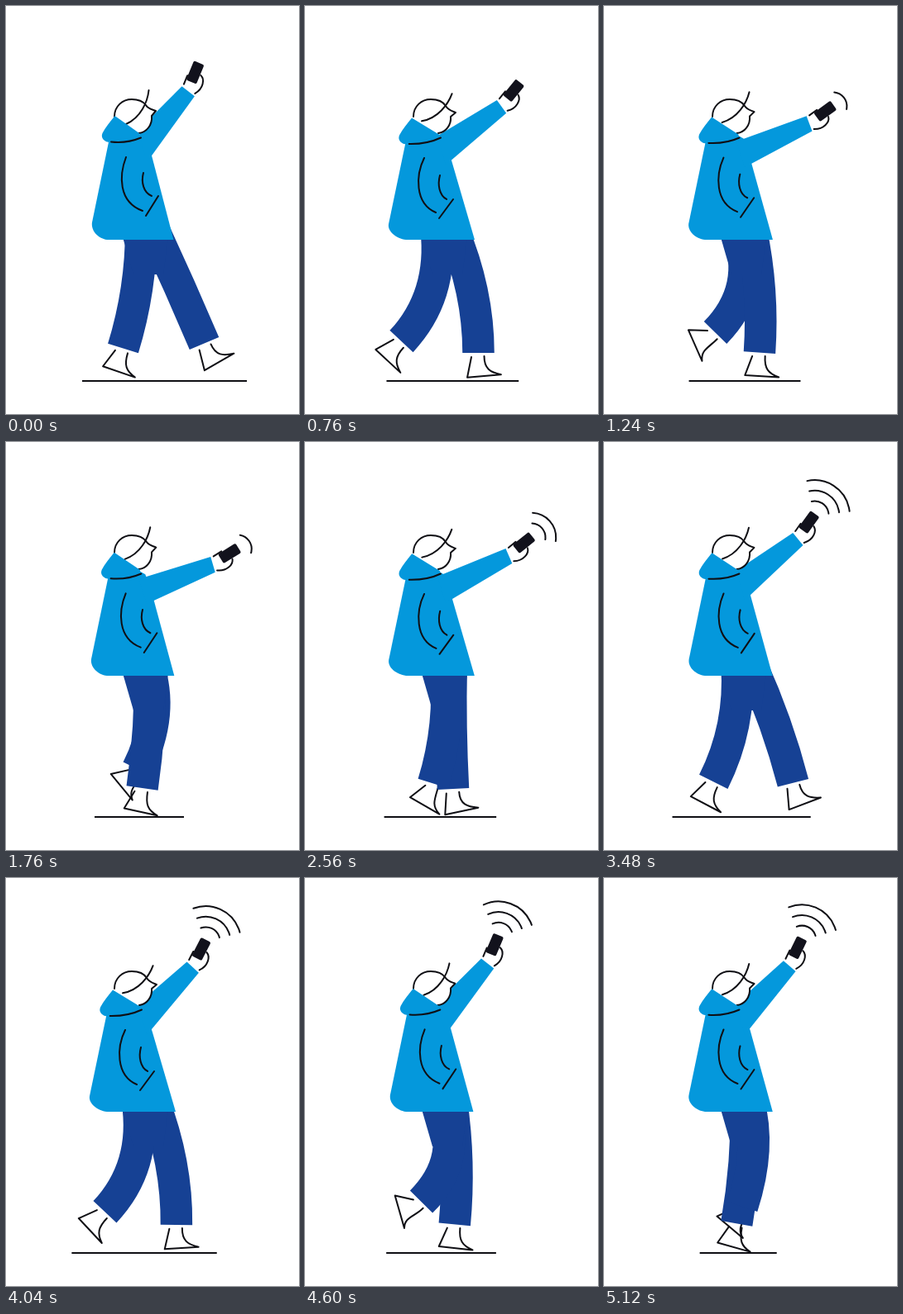
Animation, 354 px wide and 494 px high, one loop 5160 ms. Source, as an HTML page with a canvas:

```html
<!DOCTYPE html>
<html lang="en">
<head>
<meta charset="utf-8">
<title>Searching for signal</title>
<style>
  html, body { margin: 0; width: 100%; height: 100%; overflow: hidden; background: #fff; }
  canvas { display: block; width: 354px; height: 494px; }
</style>
</head>
<body>
<canvas id="stage"></canvas>
<script>
const W = 354, H = 494, LOOP = 5160, TICK = 40;
const STEP = 3200, STRIDE = 2 * STEP;
const COAT = '#0498dc', PANTS = '#164194', INK = '#0f0f14', DARK = '#12121c';
const RAD = Math.PI / 180;

const canvas = document.getElementById('stage');
const ctx = canvas.getContext('2d');
const dpr = window.devicePixelRatio || 1;
canvas.width = W * dpr;
canvas.height = H * dpr;

// Key poses of one leg: time, ankle x, ankle y, cuff angle, sole angle
const STRIKE = [239.5, 408.5, -23, -30];
const WALK = [
  [0, ...STRIKE],
  [760, 209.5, 420, 0, -5],       // flat
  [1840, 161, 419, 9, 14],        // under the body
  [2560, 155, 413.5, 17, 30],     // heel up
  [3200, 141.5, 414.5, 17, 19],   // trailing
  [3960, 116.5, 406, 43, 43],     // push off
  [4600, 140.5, 392, 45, 74],     // lifted
  [5120, 167, 398, 18, 40],       // passing
  [5760, 179, 420, -3, -12],      // reaching
  [STRIDE, ...STRIKE]
];

// Key points of the ground line: time, left end, right end
const GROUND = [[0, 92, 291], [1760, 107, 215], [3940, 76, 259], [5160, 117, 207]];

function between(keys, t) {
  const i = keys.findIndex(k => t < k[0]);
  const a = keys[i - 1], b = keys[i], u = (t - a[0]) / (b[0] - a[0]);
  return a.slice(1).map((v, j) => v + (b[j + 1] - v) * u);
}

// Arm swings down in 1600 ms and back up in 3200 ms
function armAngle(t) {
  const u = t % 4800;
  const swing = u < 1600 ? Math.cos(Math.PI * u / 1600) : -Math.cos(Math.PI * (u - 1600) / 3200);
  return -37 - 18 * swing;
}

// Torso leans once per 1600 ms, starting from upright
function leanAt(t) {
  const low = t < 800 ? 0 : 0.25;
  return low + (1 - low) * (1 - Math.cos(Math.PI * t / 800)) / 2;
}

// Points of 2 numbers are corners, points of 6 are cubic curves
function shape(parts) {
  ctx.beginPath();
  parts.forEach((p, i) => {
    if (p.length === 6) ctx.bezierCurveTo(...p);
    else if (i) ctx.lineTo(...p);
    else ctx.moveTo(...p);
  });
}
function fill(parts, color) { shape(parts); ctx.fillStyle = color; ctx.fill(); }
function line(parts) { shape(parts); ctx.strokeStyle = INK; ctx.lineWidth = 2; ctx.stroke(); }

// Local axes at (x, y) turned by deg
function frame(x, y, deg) {
  const c = Math.cos(deg * RAD), s = Math.sin(deg * RAD);
  return (u, v) => [x + c * u - s * v, y + s * u + c * v];
}

function foot([x, y, cuff, sole]) {
  const shin = frame(x, y, cuff), shoe = frame(x, y, sole);
  line([
    shin(7, 4), [...shin(7, 19), ...shoe(12, 24.5), ...shoe(25, 28.5)],
    shoe(-16, 28.5), shin(-8.5, 5)
  ]);
}

function pants([x, y, cuff]) {
  const hip = 168 + 10 * Math.tanh((x - 152) / 20);
  ctx.beginPath();
  ctx.moveTo(hip, 270);
  ctx.quadraticCurveTo(...frame(x, y, cuff)(0, -75), x, y);
  ctx.strokeStyle = PANTS;
  ctx.lineWidth = 38.5;
  ctx.lineCap = 'butt';
  ctx.stroke();
  ctx.lineCap = 'round';
}

function arm(t) {
  const deg = armAngle(t), drop = (deg + 55) / 36;
  const at = frame(165, 172, deg);
  fill([[160, 150 + 16 * drop], at(88.5, -4), at(87.5, 15.5), [170, 189.5 + 6.5 * drop]], COAT);

  ctx.save();
  ctx.translate(165, 172);
  ctx.rotate(deg * RAD);
  line([[112.5, 7], [111.5, 14, 101, 19, 90.5, 14]]);
  line([[92, -3.5], [103, -6]]);
  ctx.translate(111.5, -0.5);
  ctx.rotate(-12.5 * RAD);
  ctx.beginPath();
  ctx.roundRect(-12.5, -6.7, 25, 13.4, 2);
  ctx.fillStyle = DARK;
  ctx.fill();

  // A further, wider wave every 800 ms
  ctx.strokeStyle = INK;
  ctx.lineWidth = 2;
  for (let i = 0; i < 3 && t >= 1000 + 800 * i; i++) {
    ctx.beginPath();
    ctx.arc(11, 0.5, 17 + 12.7 * i, -48 * RAD, 48 * RAD);
    ctx.stroke();
  }
  ctx.restore();
}

function body(t) {
  const s = leanAt(t);

  fill([
    [125 - 3 * s, 160 + 3 * s], [104 - 3 * s, 262 + 2 * s],
    [102.5 - 3 * s, 272 + s, 111 - s, 281.5, 122, 283],
    [202.5 + 2.5 * s, 283], [176 + s, 181 + 6 * s], [168 + s, 160 + s], [150, 150]
  ], COAT);
  arm(t);

  const head = [
    [131, 134], [131, 121, 141, 113, 152, 113], [160, 113, 166 + s, 116, 169 + s, 120 + s],
    [172 + s, 125 + s, 176 + s, 125 + 2 * s, 181 + s, 127 + 2 * s],
    [176, 133 + s], [177, 144, 170, 153, 160 + s, 154]
  ];
  fill(head, '#fff');
  line(head);

  const brim = frame(158, 125, 14 * s);
  line([brim(14.5, -23), [...brim(13, -9), ...brim(5, 10), ...brim(-13, 18)]]);

  const x = -2.5 * s, y = 2.5 * s;
  fill([
    [131.5 + x, 133 + y], [161 - x, 154 + y], [163, 160],
    [152, 164 + y / 2, 140, 166 + y / 2, 126 + x, 165 + y],
    [119 + x, 165 + y, 114 + x, 160 + y, 116.5 + x, 154 + y],
    [120 + x, 147 + y, 126 + x, 140 + y, 131.5 + x, 133 + y]
  ], COAT);
  line([[127 + x / 2, 164.5 + y], [140, 166 + y / 2, 152, 164 + y / 2, 163 + s, 159.5]]);

  // Back arm and pocket
  line([[145 - s, 183 + s], [137 - 3 * s, 204, 135 - 3 * s, 237 + 2 * s, 165 - 7 * s, 248 + 2 * s]]);
  line([[166 - 3 * s, 202 + 3 * s], [163 - 3 * s, 213 + 3 * s, 166 - 4 * s, 226 + 3 * s, 176 - 5 * s, 230 + 4 * s]]);
  line([[184 - 5 * s, 230 + 4 * s], [169 - 7 * s, 254 + 3 * s]]);
}

function draw(t) {
  ctx.setTransform(dpr, 0, 0, dpr, 0, 0);
  ctx.fillStyle = '#fff';
  ctx.fillRect(0, 0, W, H);
  ctx.lineCap = ctx.lineJoin = 'round';

  const [left, right] = between(GROUND, t);
  ctx.fillStyle = INK;
  ctx.fillRect(left, 453, right - left, 2);

  const legs = [STEP, 0].map(lag => between(WALK, (t + lag) % STRIDE));
  legs.forEach(foot);
  legs.forEach(pants);
  fill([[141, 280], [196, 280], [190, 325], [154, 325]], PANTS);
  body(t);
}

const start = performance.now();
function tick() {
  const t = (performance.now() - start) % LOOP;
  draw(Math.floor(t / TICK) * TICK);
  requestAnimationFrame(tick);
}
tick();
</script>
</body>
</html>
```
